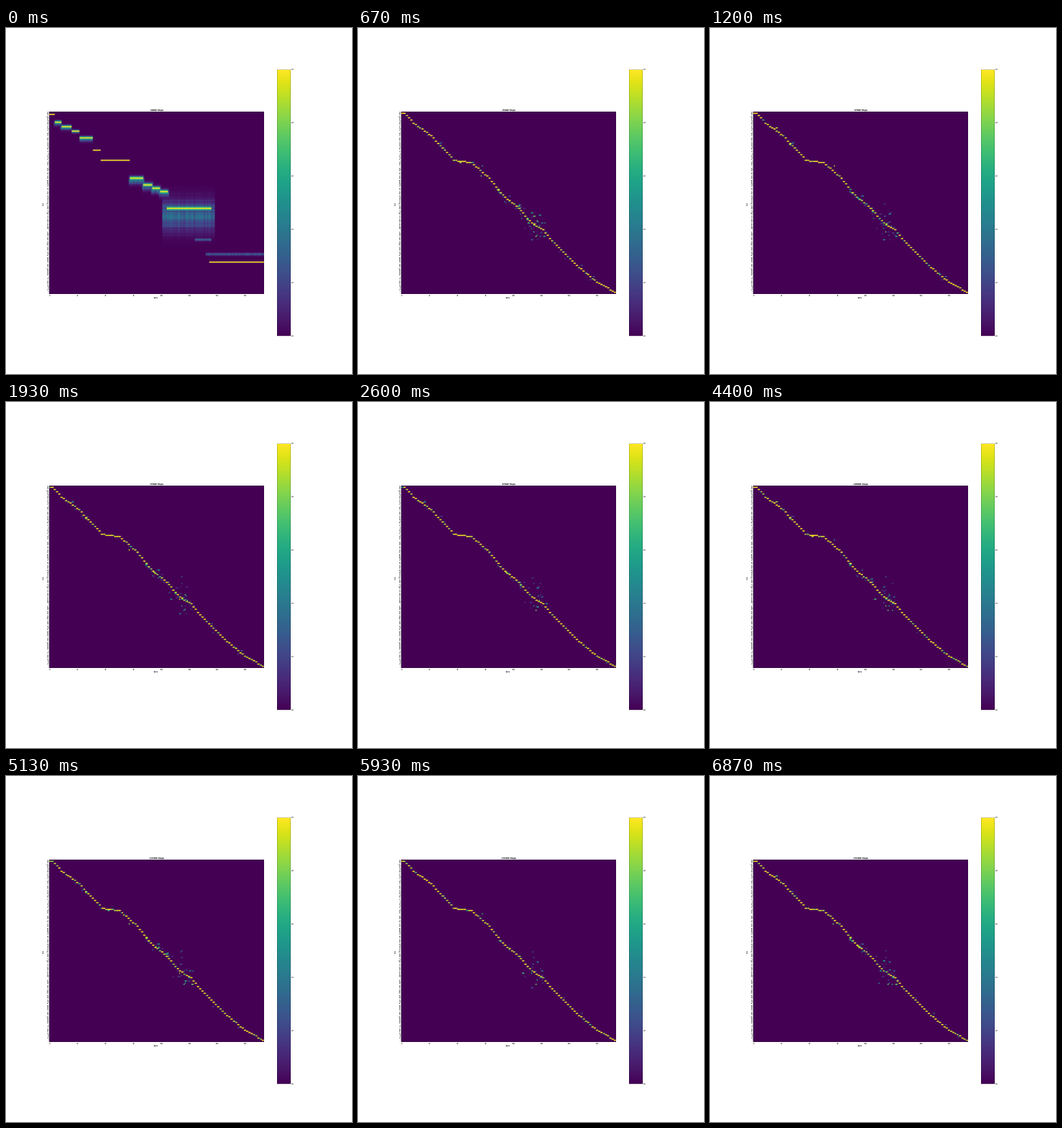
Animation of 480x480 px, one loop 7190 ms. Source, as a matplotlib script:

```python
import numpy as np
import matplotlib.pyplot as plt
from matplotlib.animation import FuncAnimation
from matplotlib.patches import PathPatch
from matplotlib.path import Path
from matplotlib.textpath import TextPath
from matplotlib.transforms import IdentityTransform

SIZE, DPI = 480, 100
ROWS, COLS = 163, 192
CELL = 297.6 / COLS
LEFT, TOP = 60.0, 116.07
LOOP_MS, FRAMES = 7190, 108
HELD = [34, 56, 62, 63, *range(80, 84), *range(104, 108)]
K = 0.155  # everything is drawn as a scaled-down large figure

plt.rcParams.update({
    "font.family": "DejaVu Sans", "font.size": 10 * K, "font.weight": "bold",
    "axes.titleweight": "bold", "axes.labelweight": "bold", "text.hinting": "none",
    "axes.linewidth": 0.8 * K, "axes.titlepad": 6 * K, "axes.labelpad": 4 * K,
})
for tick in ("xtick", "ytick"):
    plt.rcParams.update({f"{tick}.major.size": 3.5 * K, f"{tick}.major.pad": 3.5 * K,
                         f"{tick}.major.width": 0.8 * K})

# Stage coordinates of cell centres
X = LEFT + (np.arange(COLS) + 0.5) * CELL
Y = TOP + (np.arange(ROWS) + 0.5) * CELL

# Key points of the final alignment
CURVE = np.array([
    (60, 118), (66, 119), (77, 132), (100, 148), (118, 167), (134, 184),
    (158, 187), (182, 208), (202, 233), (222, 249), (240, 270), (256, 279),
    (267, 293), (302, 328), (332, 353), (358, 367)])

# Steps of the untrained alignment: x0, x1, y, halo
BARS = [
    (60, 67, 120, 0), (67, 77, 131, 3), (77, 91, 137, 3), (91, 102, 143, 2),
    (102, 120, 153, 3), (120, 132, 170, 0), (131, 171, 184, 0),
    (171, 190, 209, 5), (190, 203, 217, 5), (203, 214, 222, 5),
    (213, 224, 227, 5), (222, 285, 250, 20), (282, 358, 324.5, 0)]
ECHOES = [(222, 285, 264), (262, 285, 294), (277, 358, 314)]


def row_of(y):
    return np.clip(np.floor((y - TOP) / CELL), 0, ROWS - 1).astype(int)


def early_map():
    rng = np.random.default_rng(3)
    grain = np.outer(rng.uniform(0.6, 1.2, ROWS), rng.uniform(0.7, 1.1, COLS))
    r = np.arange(ROWS)[:, None]
    out = np.zeros((ROWS, COLS))
    for x0, x1, y, halo in BARS:
        core = np.exp(-((r - row_of(y)) / (0.5 + 0.25 * min(halo, 4))) ** 2)
        out = np.maximum(out, core * ((X >= x0) & (X <= x1)))
        if halo:
            cloud = 0.38 * np.exp(-((Y[:, None] - y - halo / 2) / halo) ** 2)
            reach = halo / 4
            out = np.maximum(out, cloud * grain * ((X >= x0 - reach) & (X <= x1 + reach)))
    for x0, x1, y in ECHOES:
        echo = 0.4 * np.exp(-((r - row_of(y)) / 1.1) ** 2)
        out = np.maximum(out, echo * grain * ((X >= x0) & (X <= x1)))
    return out


def scatter(count=130):
    """Stray cells near the curve, densest and widest where it is uncertain."""
    rng = np.random.default_rng(11)
    x = np.concatenate([rng.normal(244, 11, count // 2), rng.normal(206, 8, count // 5),
                        rng.uniform(75, 345, count * 3 // 10)])
    spread = 4 + 10 * np.exp(-((x - 244) / 18) ** 2)
    y = np.interp(x, *CURVE.T) + rng.normal(0, spread)
    cols = ((x - LEFT) / CELL).astype(int)
    return list(zip(row_of(y), cols, rng.integers(1, 3, x.size), rng.random(x.size)))


EARLY, SPOTS = early_map(), scatter()


def aligned_map(step):
    rng = np.random.default_rng(100 + step)
    data = np.zeros((ROWS, COLS))
    chance = 0.35 + 0.3 * np.exp(-step / 20)
    for row, col, width, level in SPOTS:
        if rng.random() < chance:
            data[row, col:col + width] = 0.1 + 0.9 * level ** 2 * rng.uniform(0.5, 1)
    # Each row is held for two columns before the line moves on
    rows = row_of(np.interp(np.repeat(X[::2], 2) + CELL / 2, *CURVE.T))
    data[rows, np.arange(COLS)] = 1 - 0.5 * rng.random(COLS) ** 6
    return data


def attention(step):
    blur = np.exp(-0.6 * step)
    data = blur * EARLY + (1 - blur) * aligned_map(step)
    return np.kron(data, np.ones((4, 4)))


def letter_column(text, size=10 * K * DPI / 72):
    paths = []
    for ch, y in zip(text, SIZE - Y - 0.36 * size):
        if ch != " ":
            width = TextPath((0, 0), ch, size=size).get_extents().x1
            paths.append(TextPath((LEFT - 1.5 - width, y), ch, size=size))
    return Path.make_compound_path(*paths)


SENTENCE = ("the morning train left the station a little late, and so the people "
            "on the platform had time to buy bread, read the news and talk about "
            "the weather in the hills.").ljust(ROWS, ".")[:ROWS]

fig, ax = plt.subplots(figsize=(SIZE / DPI, SIZE / DPI), dpi=DPI)
im = ax.imshow(attention(0), vmin=0, vmax=1, cmap="viridis",
               extent=(-0.5, COLS - 0.5, ROWS - 0.5, -0.5),
               interpolation="antialiased", interpolation_stage="rgba")
bar = fig.colorbar(im, ax=ax, ticks=np.linspace(0, 1, 6))
bar.outline.set_snap(False)
ax.spines[:].set_snap(False)
ax.set_xticks(range(0, COLS, 25))
ax.set_yticks([])
ax.set_xlabel("Audio")
fig.text(52.3 / SIZE, 1 - 243 / SIZE, "Text", rotation=90, ha="center", va="center")
ax.hlines(np.arange(ROWS), -1, -0.5, color="k", lw=0.8 * K, clip_on=False)
ax.set_xlim(-0.5, COLS - 0.5)
ax.set_ylim(ROWS - 0.5, -0.5)
fig.add_artist(PathPatch(letter_column(SENTENCE), fc="k", lw=0,
                         transform=IdentityTransform()))
title = ax.set_title("")


def update(frame):
    step = frame - sum(h <= frame for h in HELD)
    im.set_data(attention(step))
    title.set_text(f"{10000 + 1500 * step} Steps")
    return im, title


anim = FuncAnimation(fig, update, frames=FRAMES, interval=LOOP_MS / FRAMES,
                     repeat=True, repeat_delay=0, blit=False)
plt.show()
```
